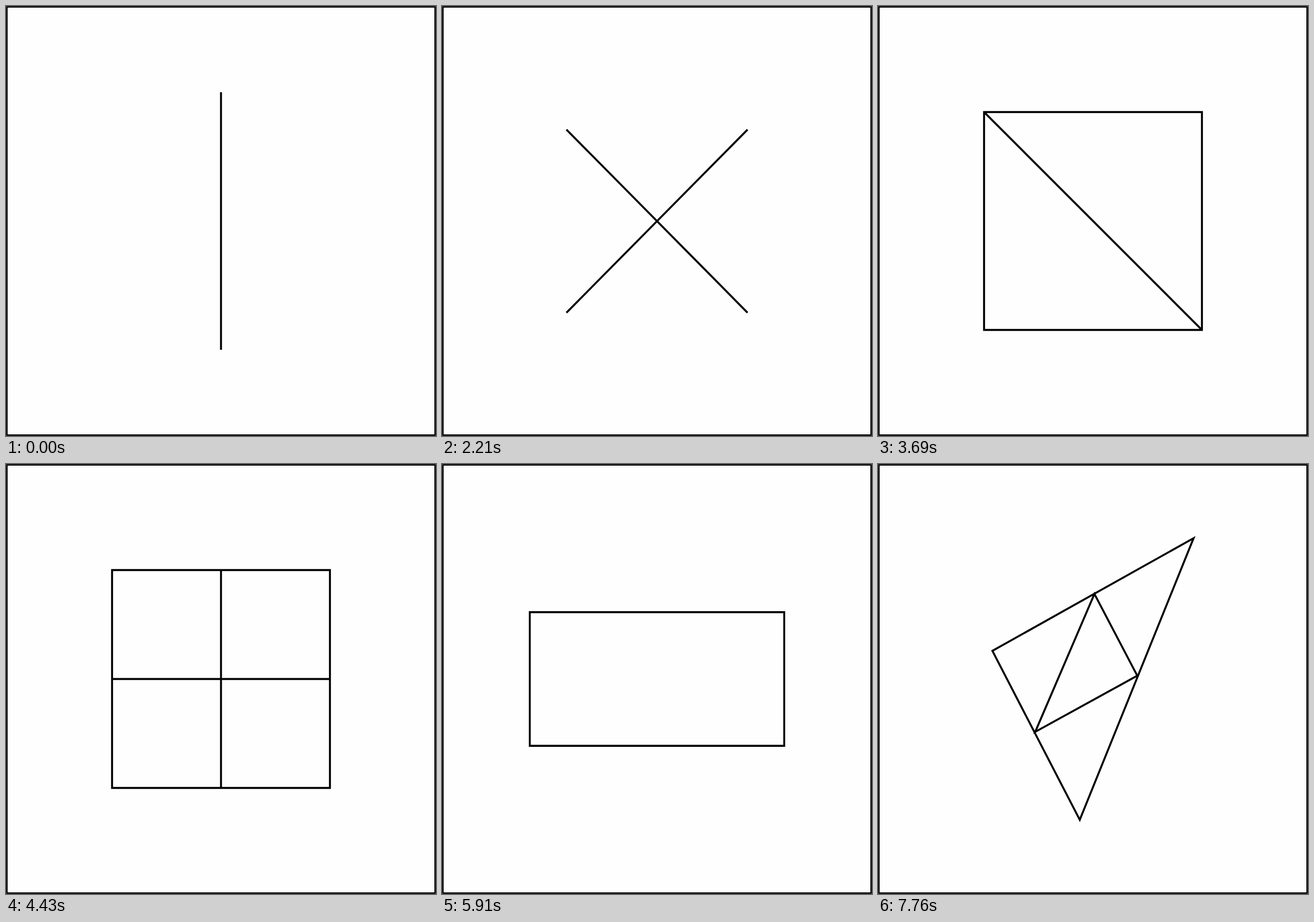
An HTML page that plays this animation: 748 by 748 pixels, repeating every 8000 ms.

```html
<!DOCTYPE html>
<html lang="en">
<head>
<meta charset="utf-8">
<title>Line shapes</title>
<style>
html, body { margin: 0; height: 100%; overflow: hidden; background: #fefefe; }
svg { display: block; width: 100%; height: 100%; }
path, rect { fill: none; stroke: #000; stroke-width: 3.4; stroke-miterlimit: 10; }
rect { stroke-width: 2.6; }
</style>
</head>
<body>
<svg viewBox="0 0 748 748">
  <rect x="1.5" y="1.5" width="745" height="745"/>
  <path id="shape"/>
</svg>
<script>
const LOOP = 8000, STEP = 370, FIRST = 730;

const line = (x1, y1, x2, y2) => `M${x1} ${y1}L${x2} ${y2}`;
const poly = (...p) => `M${p.join(' ')}Z`;
const box = (x1, y1, x2, y2) => `M${x1} ${y1}H${x2}V${y2}H${x1}Z`;
const circle = (x, y, r) =>
  `M${x - r} ${y}a${r} ${r} 0 1 0 ${2 * r} 0a${r} ${r} 0 1 0 ${-2 * r} 0Z`;
const dots = (xs, ys, r) => xs.flatMap(x => ys.map(y => circle(x, y, r))).join('');

const upright = line(374, 150, 374, 598);
const level = line(150, 374, 598, 374);
const rising = line(216.5, 533.5, 531.5, 215);
const falling = line(216.5, 215, 531.5, 533.5);
const window4 = box(184.5, 184.5, 563.5, 563.5);
const down = line(184.5, 184.5, 563.5, 563.5);
const up = line(184.5, 563.5, 563.5, 184.5);
const kite = poly(199, 325, 549, 129, 351, 619);

const shapes = [
  upright,
  level,
  line(155, 155, 593, 593),
  rising,
  upright + level,
  rising + falling,
  circle(374, 374, 218),
  box(157.8, 158.2, 590.2, 590),
  poly(374, 166, 580, 583, 168, 583),
  window4 + down,
  window4 + down + up,
  window4 + line(374, 184.5, 374, 563.5) + line(184.5, 374, 563.5, 374),
  circle(196.5, 374.5, 83) + circle(551.5, 374.5, 83) + line(279.5, 374.5, 468.5, 374.5),
  'M275 346A83.2 83.2 0 1 0 275 402.5M473.5 346A83.2 83.2 0 1 1 473.5 402.5' +
    line(273.5, 346, 477, 346) + line(271.5, 402.5, 475, 402.5),
  circle(374, 374, 216) + circle(374, 374, 108),
  box(152.7, 257.7, 595.3, 490.3),
  circle(267, 374, 106.5) + circle(481, 374, 106.5),
  box(208.5, 147.5, 540, 601) +
    dots([315], [252.5, 380.2, 506.7], 19.3) + dots([438], [251.8, 379.5, 506], 19.3),
  box(156.7, 208.5, 591.3, 540) + dots([252, 374, 496], [312, 436], 19.3),
  kite,
  kite + poly(376.5, 226, 451, 368.3, 273.5, 466)
];

const shape = document.getElementById('shape');
let shown = -1;

function draw() {
  const t = performance.now() % LOOP;
  const i = t < FIRST ? 0 : 1 + Math.floor((t - FIRST) / STEP);
  if (i !== shown) shape.setAttribute('d', shapes[shown = i]);
  requestAnimationFrame(draw);
}
draw();
</script>
</body>
</html>
```
